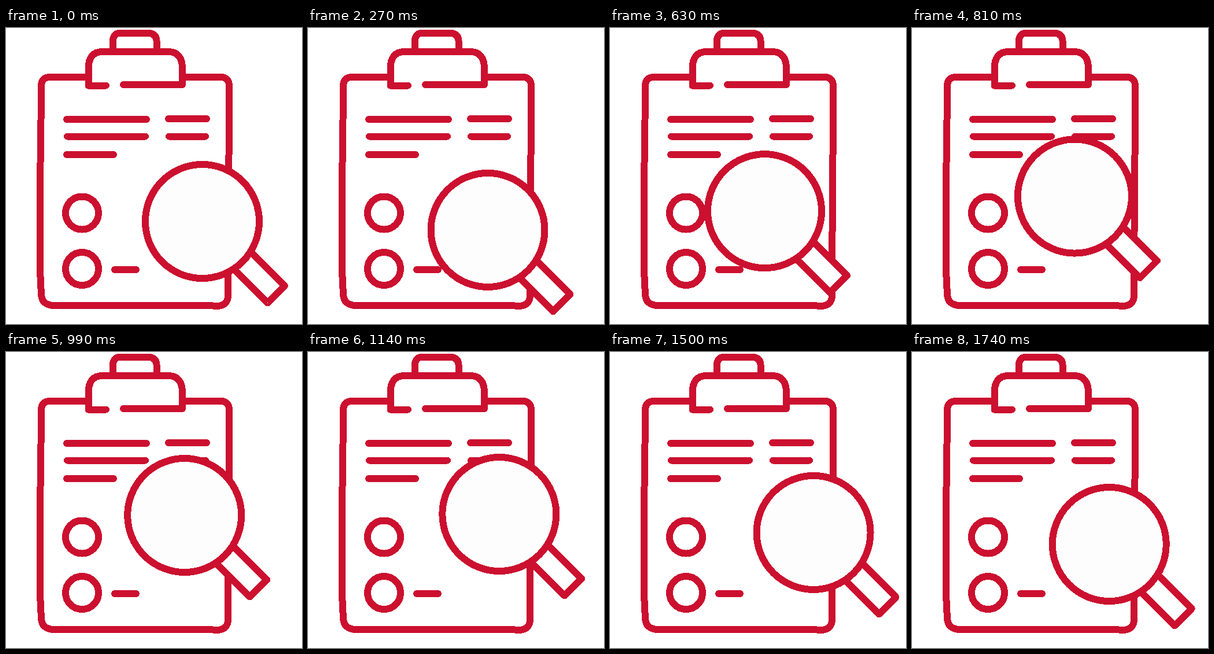
An HTML page for the animation above (1.77 s loop, 512x512 px).

```html
<!DOCTYPE html>
<html lang="en">
<head>
<meta charset="utf-8">
<title>Clipboard search</title>
<style>
  html, body { margin: 0; width: 100%; height: 100%; overflow: hidden; background: #fff; }
  svg { display: block; width: 100%; height: 100%; }
</style>
</head>
<body>
<svg viewBox="0 0 512 512" fill="none" stroke="#cc102f" stroke-width="12"
     stroke-linecap="round" stroke-linejoin="round" shape-rendering="crispEdges">
  <!-- board -->
  <path d="M140 85H76Q62 85 61 99L60.500 160L59 270V420L61 461Q62 479 82 480H350L366 481Q384 480 384 462L385 250L386 190V98Q385 85 370 84.500H308"/>
  <!-- clip -->
  <path d="M173 99.500H142.500V70Q143 41.500 166 41H282Q304 42 305 68V98H203"/>
  <path d="M185 39V21Q186 9 198 8.500H246Q260 10 260.500 22V39"/>
  <!-- text rows -->
  <path d="M105 158H243M281 157H347M106 187.500H241M282 187.500H345M105 219H186M188 418H225"/>
  <circle cx="131.500" cy="320" r="28.500"/>
  <circle cx="131.500" cy="416.500" r="28.500"/>
  <!-- closed route of the glass: a half ellipse on the left, a wider bulge on the right -->
  <path id="route" stroke="none" d="M339.500 334.500C333.500 341 321 349.500 309.500 349.500A42 33.500 0 0 1 309.500 282.500C330 274.500 354.500 286 353.500 301C353 314.500 349.500 323.500 339.500 334.500"/>
  <g id="glass">
    <path fill="#fff" stroke-linecap="butt" d="M85 54L142.500 111.500L113 141L56 84"/>
    <circle fill="#fdfdfd" r="98.500"/>
  </g>
</svg>
<script>
const LOOP = 1770, STEP = 30, HOLD = 60;
const STEPS = (LOOP - HOLD) / STEP;
const LEAD = 20; // how far the glass runs ahead of an even pace
const route = document.getElementById('route');
const glass = document.getElementById('glass');
const length = route.getTotalLength();

function draw(time) {
  const step = Math.max(0, Math.floor((time % LOOP - HOLD) / STEP));
  const part = step / STEPS;
  const distance = length * part + LEAD * Math.sin(Math.PI * part ** 1.5);
  const { x, y } = route.getPointAtLength(distance);
  glass.setAttribute('transform', `translate(${x.toFixed(2)} ${y.toFixed(2)})`);
}

const start = performance.now();
function tick() {
  draw(performance.now() - start);
  requestAnimationFrame(tick);
}
tick();
</script>
</body>
</html>
```
